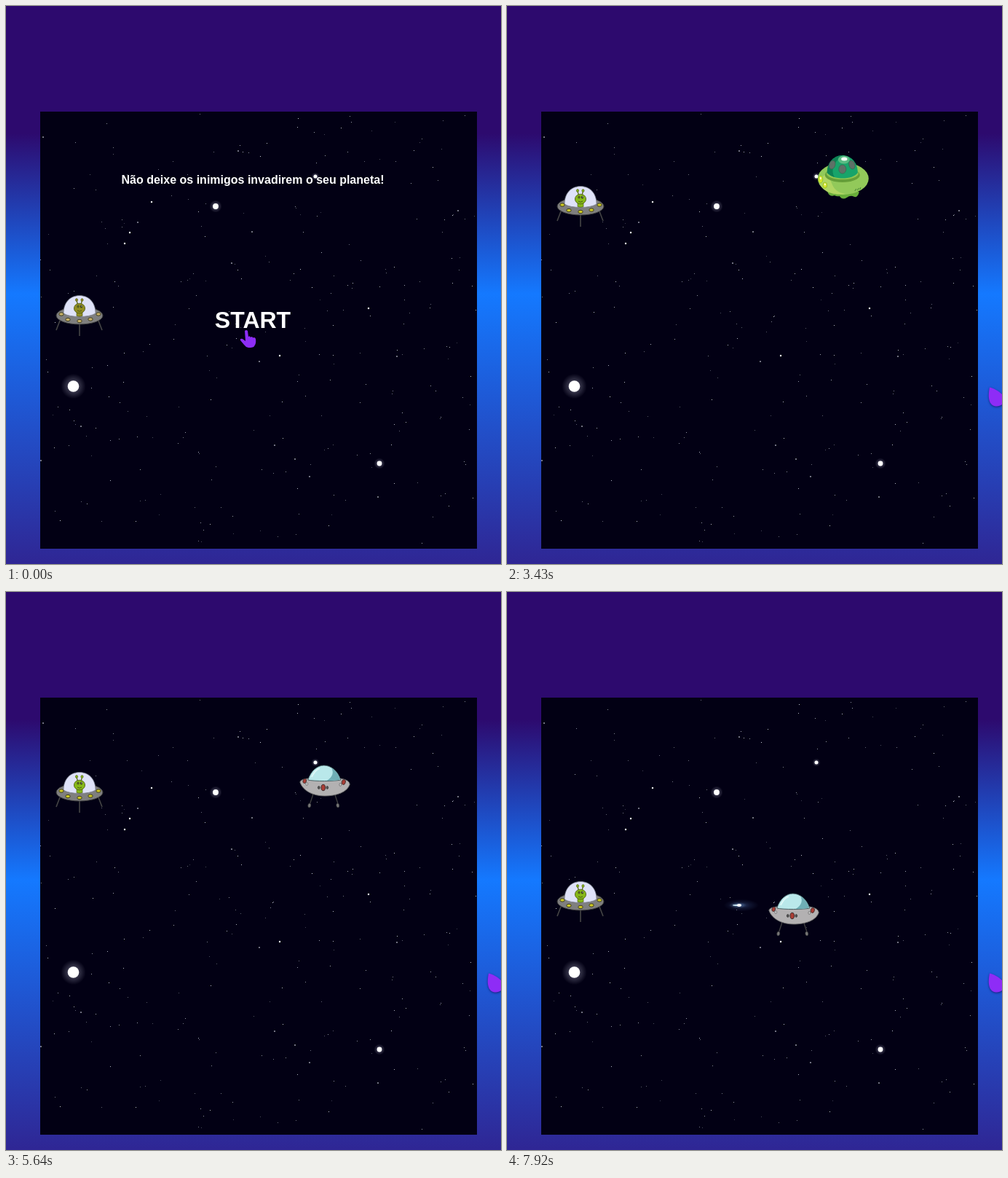
An HTML page with a canvas that plays this animation: 680x766 px, repeating every 8 s.

```html
<!DOCTYPE html>
<html lang="pt">
<head>
<meta charset="utf-8">
<style>
html, body { margin: 0; width: 100%; height: 100%; overflow: hidden; background: #2d0a6e; }
canvas { display: block; }
</style>
</head>
<body>
<canvas id="stage" width="680" height="766"></canvas>
<script>
const LOOP = 8000;
const canvas = document.getElementById('stage');
let ctx = canvas.getContext('2d');

const shipSteps = [[0, 397], [2670, 347], [2940, 297], [3200, 247], [3600, 197], [4900, 247],
  [5180, 297], [5560, 247], [6700, 297], [6950, 347], [7250, 397]];
const enemies = [
  { draw: greenSaucer, from: 3120, x: 462, y: 235, at: 3430, hit: 4255, boom: 297 },
  { draw: greySaucer, from: 4960, x: 438, y: 267, at: 5640, hit: 6145, boom: 337 },
  { draw: greySaucer, from: 7050, x: 394, y: 443, at: 7920, hit: Infinity }
];
const lasers = [[4240, 275, 230], [6062, 275, 280], [7838, 275, 430]];
const ENEMY_SPEED = 0.21, LASER_SPEED = 0.505, FADE = 1000;

const clamp = v => Math.min(1, Math.max(0, v));
const swing = p => 0.5 - Math.cos(Math.PI * clamp(p)) / 2;

function paint(fill, stroke, width = 1) {
  if (fill) { ctx.fillStyle = fill; ctx.fill(); }
  if (stroke) { ctx.strokeStyle = stroke; ctx.lineWidth = width; ctx.stroke(); }
}
function oval(x, y, rx, ry, fill, stroke, width, turn = 0) {
  ctx.beginPath();
  ctx.ellipse(x, y, rx, ry, turn, 0, Math.PI * 2);
  paint(fill, stroke, width);
}
function shape(d, fill, stroke, width) {
  const path = new Path2D(d);
  if (fill) { ctx.fillStyle = fill; ctx.fill(path); }
  if (stroke) { ctx.strokeStyle = stroke; ctx.lineWidth = width || 1; ctx.stroke(path); }
}
function at(x, y, draw, alpha = 1) {
  ctx.save();
  ctx.translate(x, y);
  ctx.globalAlpha = alpha;
  draw();
  ctx.restore();
}
function glow(x, y, r, color) {
  const g = ctx.createRadialGradient(x, y, 0, x, y, r);
  g.addColorStop(0, `rgba(${color},.7)`);
  g.addColorStop(0.5, `rgba(${color},.25)`);
  g.addColorStop(1, `rgba(${color},0)`);
  ctx.fillStyle = g;
  ctx.fillRect(x - r, y - r, r * 2, r * 2);
}

function makeBackdrop() {
  const layer = document.createElement('canvas');
  layer.width = 680;
  layer.height = 766;
  const main = ctx;
  ctx = layer.getContext('2d');
  const sky = ctx.createLinearGradient(0, 0, 0, 766);
  [[0, '#2d0a6e'], [0.228, '#2d0a6e'], [0.516, '#1479ff'], [1, '#2f2694']]
    .forEach(([p, c]) => sky.addColorStop(p, c));
  ctx.fillStyle = sky;
  ctx.fillRect(0, 0, 680, 766);
  ctx.fillStyle = '#020014';
  ctx.fillRect(47, 145, 600, 600);

  let seed = 71;
  const random = () => (seed = seed * 16807 % 2147483647) / 2147483647;
  for (let i = 0; i < 270; i++) {
    const x = 47 + Math.floor(random() * 599), y = 146 + Math.floor(random() * 597);
    ctx.fillStyle = `rgba(225,228,245,${0.25 + random() * 0.65})`;
    ctx.fillRect(x, y, 1, 1);
  }
  const bright = [[200, 269], [170, 311], [163, 326], [376, 480], [498, 415]];
  const dim = [[310, 353], [537, 481], [369, 603], [397, 622], [417, 646], [348, 488], [103, 577],
    [319, 199], [621, 281], [181, 297], [48, 624], [51, 180], [511, 674], [338, 310]];
  bright.forEach(([x, y]) => oval(x, y, 1.2, 1.2, '#fff'));
  dim.forEach(([x, y]) => oval(x, y, 1.1, 1.1, '#8d8d9c'));
  [[92.5, 522, 7.8], [288, 275, 3.9], [513, 628, 3.4], [425, 234, 2.5]].forEach(([x, y, r]) => {
    glow(x, y, r * 2.2, '190,190,215');
    oval(x, y, r, r, '#fff');
  });
  ctx = main;
  return layer;
}

// Origin: top centre of the dome.
function playerShip(skin, lamp) {
  shape('M-27 35L-32 48M0 40V56M26 35L31 48', null, '#454545', 1.6);
  oval(0, 28, 32, 12, '#7f7f7f', '#3c3c3c', 1);
  shape('M-22 25C-22 9-12 .5 0 .5S22 9 22 25C13 31-13 31-22 25Z', '#dfe2f8', '#777a88', 0.8);
  shape('M-2.5 13L-4 7M2 13L3.5 7', null, '#5e6b1c', 1.3);
  oval(-4, 6.5, 1.6, 1.9, skin, '#4c5716', 0.6);
  oval(3.5, 6.5, 1.6, 1.9, skin, '#4c5716', 0.6);
  shape('M-4 22H4V28.5Q0 30-4 28.5Z', skin, '#4c5716', 0.6);
  oval(0, 18, 7.6, 6.8, skin, '#4c5716', 0.8);
  oval(-2, 15.6, 1.7, 2, '#555f20');
  oval(2.5, 15.6, 1.7, 2, '#39411b');
  oval(3, 15, 0.6, 0.7, '#dfe2f8');
  shape('M-3 21Q0 23.5 3 21', null, '#45501a', 0.9);
  [[-25, 26], [-16, 33.5], [0, 35.5], [15, 33], [26, 26]]
    .forEach(([x, y]) => oval(x, y, 3.2, 2.2, lamp, '#3c3b22', 1));
}

// Enemies and the blast are drawn about their centre.
function greenSaucer() {
  shape('M-22 19Q-19 28-12 25Q-8 27-5 26Q-1 32 5 28Q9 25 13 26Q20 30 22 20Z', '#68ad3a');
  oval(0, 2, 35, 22, '#92c95a');
  shape('M-34 3C-31 23-8 25 3 23C-15 20-14 9-22-5Z', '#b1d663');
  oval(-1, -3, 24, 10, '#659e38');
  oval(-1, -5, 22, 8, '#8ec550');
  shape('M-22-6C-22-22-11-30-1-30S20-22 20-6C13 4-14 4-22-6Z', '#17a46a');
  shape('M-22-6C-22-22-11-30-1-30C-14-20-17-9-12 0Q-18-2-22-6Z', '#0d8255');
  oval(1, -24, 8, 5.5, '#5aba83');
  oval(1.5, -25, 4.2, 2.5, '#f1fff5');
  oval(-15, -17, 4, 6, '#5e7167', '#3e6652', 0.8, 0.3);
  oval(12, -17, 4, 6, '#5e7167', '#3e6652', 0.8, -0.3);
  oval(-1, -11, 5, 6, '#5e7167', '#3e6652', 0.8);
  oval(-31, 3, 3, 5, '#d3e72b', '#8fb92b', 0.8);
  oval(-25, 11, 3, 4, '#d3e72b', '#8fb92b', 0.8);
  oval(-31, 1.5, 1, 1.8, '#fbffd1');
  oval(-25, 10, 1, 1.4, '#fbffd1');
  shape('M16 19L18 16M19.5 18L21.5 15M23 17L24 14', null, '#548f3d', 1.3);
}

function greySaucer() {
  shape('M-16 11L-20 23M14 11L18 23', null, '#414141', 1.3);
  oval(-21, 26, 1.9, 2.8, '#777', '#444', 0.7, 0.2);
  oval(18, 26, 1.9, 2.8, '#777', '#444', 0.7, -0.2);
  shape('M-34-6Q-33-10-23-11H22Q34-9 34.5-3C31 8 16 13 0 13S-30 6-34-6Z', '#b3b1b2', '#686868', 0.9);
  shape('M-23-9C-19-22-10-29-1-29S18-22 22-9C14-7-15-7-23-9Z', '#b9e8ea', '#3a5357', 0.9);
  shape('M9-26C17-21 20-14 21-9.5Q14-8 3-8C11-13 13-20 9-26Z', '#6faeb5');
  shape('M-18-13Q-13-23-7-25', null, '#def7f7', 2);
  oval(-2, 1.5, 2.8, 4.2, '#aa3d35', '#382c2c', 1);
  oval(-8, 1.5, 1.4, 2, '#555', '#333', 0.7);
  oval(3.5, 1.5, 1.4, 2, '#555', '#333', 0.7);
  oval(-27.5, -7.5, 2.3, 3.1, '#aa3d35', '#403030', 0.9, 0.3);
  oval(26, -6, 2.6, 3.5, '#aa3d35', '#403030', 0.9, 0.3);
  oval(-24.5, -3.5, 1.3, 2, '#ddd', '#555', 0.7);
  oval(21.5, -2.5, 1.3, 2, '#ddd', '#555', 0.7);
}

function blast() {
  const tips = [[-2, -25], [11, -22], [25, -23], [21, -11], [27, 0], [20, 6], [25, 17], [12, 16],
    [4, 23], [-4, 20], [-11, 19], [-23, 23], [-18, 11], [-27, 1], [-20, -6], [-23, -14], [-11, -19]];
  ctx.beginPath();
  tips.forEach(([x, y], i) => {
    const [nx, ny] = tips[(i + 1) % tips.length];
    const a = Math.atan2(y + ny, x + nx);
    ctx.lineTo(x, y);
    ctx.lineTo(Math.cos(a) * 17.5, Math.sin(a) * 14.5);
  });
  ctx.closePath();
  ctx.lineJoin = 'miter';
  paint('#f7e500', '#e84c10', 1.8);
}

function laser() {
  ctx.save();
  ctx.scale(1, 0.35);
  glow(5, 0, 24, '55,80,130');
  glow(0, 0, 12, '130,175,220');
  ctx.restore();
  oval(-1, 0, 6, 1.1, '#c8e6f4');
  oval(2, 0, 3, 1.9, '#fff');
}

// Origin: fingertip.
function hand() {
  shape('M-2 1Q0-1 2 1L3 9Q5 7 6 10Q8 8 9 10.5Q12 9 13 12Q14 18 11 22Q10 24 3 24Q-1 23-3 20L-8 14Q-9 11-5 12L-1 15Z',
    '#8d2df5');
}
function drop() {
  ctx.shadowColor = 'rgba(20,5,80,.65)';
  ctx.shadowBlur = 3;
  ctx.shadowOffsetY = 1;
  shape('M0 .5C-2 11-2 21 4 25C11 29 20 25 21 17C21 11 8 2 0 .5Z', '#8e2cf6');
}

function label(text, y, size) {
  ctx.font = `bold ${size}px "Liberation Sans", Arial, sans-serif`;
  ctx.textAlign = 'center';
  ctx.fillStyle = '#fff';
  ctx.fillText(text, 339, y);
}

function drawPointer(t) {
  if (t < 890) {
    const p = t < 70 ? 0 : Math.min(3, Math.floor((t - 70) / 70) + 1) / 3;
    at(330 + 4 * p, 445 - 11 * p, hand);
    return;
  }
  const p = swing((t - 890) / 790);
  let x = 334 + 338 * p, y = 435 + 92 * p;
  if (t >= 1810) { x = 668; y = 525; }
  if (t >= 1870) { x = 663; y = 523; }
  at(x, y, drop);
}

function render(t) {
  ctx.drawImage(backdrop, 0, 0);
  if (t < 890) {
    label('Não deixe os inimigos invadirem o seu planeta!', 244, 16);
    label('START', 442, 32);
  }
  const shipY = shipSteps.filter(s => s[0] <= t).pop()[1];
  const early = t < 2670;
  at(101, shipY, () => playerShip(early ? '#918d22' : '#86b819', early ? '#c9b268' : '#cfcb24'));

  for (const e of enemies) {
    if (t < e.from || t >= e.hit + FADE) continue;
    if (t < e.hit) at(e.x - (t - e.at) * ENEMY_SPEED, e.y, e.draw);
    else at(e.boom, e.y + 1, blast, 1 - swing((t - e.hit) / FADE));
  }
  for (const [start, x0, y] of lasers) {
    const x = x0 + (t - start) * LASER_SPEED;
    if (t >= start && x < 575) at(x, y, laser);
  }
  drawPointer(t);
}

const backdrop = makeBackdrop();
const begin = performance.now();
function tick() {
  render((performance.now() - begin) % LOOP);
  requestAnimationFrame(tick);
}
tick();
</script>
</body>
</html>
```
